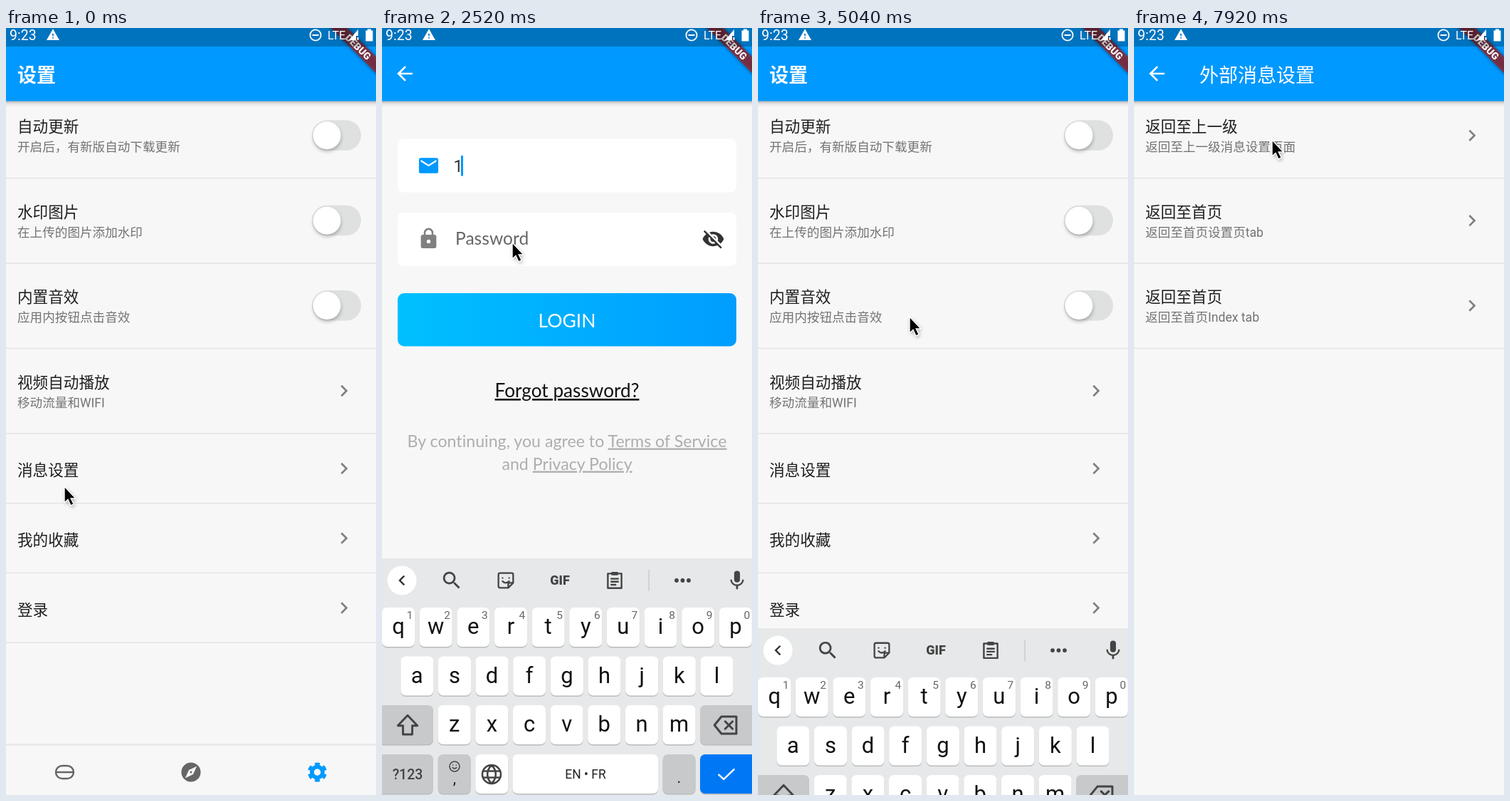
Recreate the animation shown at these times as an HTML page. Size 520 px wide and 1076 px high, loop 8000 ms.

```html
<!DOCTYPE html>
<html lang="zh-CN">
<head>
<meta charset="utf-8">
<title>设置</title>
<style>
html, body { margin: 0; width: 100%; height: 100%; overflow: hidden; background: #f7f7f7 }
svg { display: block; width: 100vw; height: 100vh; font-family: Roboto, "Noto Sans CJK SC", sans-serif }
.brand { font-family: Lato, sans-serif; font-variant-ligatures: none }
.line { fill: none; stroke: #444; stroke-width: 2; stroke-linejoin: round; stroke-linecap: round }
</style>
</head>
<body>
<svg id="stage" viewBox="0 0 520 1076"></svg>
<script>
const BLUE = '#0099ff', GREY = '#808080', DP = 1.357, HEIGHT = 1082;

const rect = (x, y, w, h, fill, more = '') =>
  `<rect x="${x}" y="${y}" width="${w}" height="${h}" fill="${fill}" ${more}/>`;
const circle = (x, y, r, more) => `<circle cx="${x}" cy="${y}" r="${r}" ${more}/>`;
const text = (s, x, y, size, fill, more = '') =>
  `<text x="${x}" y="${y}" font-size="${size}" fill="${fill}" ${more}>${s}</text>`;
const mid = 'text-anchor="middle"';
// 24-unit icon centred on x, y
const icon = (d, x, y, more, scale = DP) =>
  `<path transform="translate(${x} ${y}) scale(${scale}) translate(-12 -12)" d="${d}" ${more}/>`;
const fill = c => `fill="${c}"`;
const line = 'class="line"';

const paths = {
  back: 'M20 11H7.83l5.59-5.59L12 4l-8 8 8 8 1.41-1.41L7.83 13H20z',
  next: 'M10 6 8.59 7.41 13.17 12l-4.58 4.59L10 18l6-6z',
  prev: 'M15.41 7.41 14 6l-6 6 6 6 1.41-1.41L10.83 12z',
  warn: 'M1 21h22L12 2 1 21zm12-3h-2v-2h2v2zm0-4h-2v-4h2v4z',
  compass: 'M12 10.9a1.1 1.1 0 1 0 0 2.2 1.1 1.1 0 0 0 0-2.2zM12 2a10 10 0 1 0 0 20 10 10 0 0 0 0-20zm2.19 12.19L6 18l3.81-8.19L18 6z',
  mail: 'M20 4H4a2 2 0 0 0-2 2v12a2 2 0 0 0 2 2h16a2 2 0 0 0 2-2V6a2 2 0 0 0-2-2zm0 4l-8 5-8-5V6l8 5 8-5z',
  lock: 'M18 8h-1V6A5 5 0 0 0 7 6v2H6a2 2 0 0 0-2 2v10a2 2 0 0 0 2 2h12a2 2 0 0 0 2-2V10a2 2 0 0 0-2-2zm-6 9a2 2 0 1 1 0-4 2 2 0 0 1 0 4zm3.1-9H8.9V6a3.1 3.1 0 0 1 6.2 0z',
  hidden: 'M12 7c2.76 0 5 2.24 5 5 0 .65-.13 1.26-.36 1.83l2.92 2.92c1.51-1.26 2.7-2.89 3.43-4.75-1.73-4.39-6-7.5-11-7.5-1.4 0-2.74.25-3.98.7l2.16 2.16C10.74 7.13 11.35 7 12 7zM2 4.27l2.74 2.74C3.08 8.3 1.78 10.02 1 12c1.73 4.39 6 7.5 11 7.5 1.55 0 3.03-.3 4.38-.84L19.73 22 21 20.73 3.27 3zM7.53 9.8l1.55 1.55c-.05.21-.08.43-.08.65 0 1.66 1.34 3 3 3 .22 0 .44-.03.65-.08l1.55 1.55c-.67.33-1.41.53-2.2.53-2.76 0-5-2.24-5-5 0-.79.2-1.53.53-2.2zm4.31-.78l3.15 3.15.02-.16c0-1.66-1.34-3-3-3z',
  search: 'M15.5 14h-.79l-.28-.27A6.5 6.5 0 1 0 9.5 16c1.61 0 3.09-.59 4.23-1.57l.27.28v.79l5 5L20.49 19zm-6 0a4.5 4.5 0 1 1 0-9 4.5 4.5 0 0 1 0 9z',
  sticker: 'M5 3h14a2 2 0 0 1 2 2v10l-6 6H5a2 2 0 0 1-2-2V5a2 2 0 0 1 2-2zM21 15h-4a2 2 0 0 0-2 2v4M8 9h.1M16 9h.1M8 13q4 4 8 0',
  clip: 'M4 4h16v17H4zM9 3h6v2H9zM8 10h8M8 13.5h8M8 17h5',
  mic: 'M12 14a3 3 0 0 0 3-3V5a3 3 0 0 0-6 0v6a3 3 0 0 0 3 3zm5.3-3c0 3-2.54 5.1-5.3 5.1S6.7 14 6.7 11H5c0 3.41 2.72 6.23 6 6.72V21h2v-3.28c3.28-.48 6-3.3 6-6.72z',
  shift: 'M12 2.5 2.5 12.5h5V21h9v-8.5h5z',
  erase: 'M8 4h14v16H8L1.5 12zM11.5 8.5l7 7m0-7l-7 7',
  globe: 'M12 2a10 10 0 0 0 0 20 10 10 0 0 0 0-20c-6 6-6 14 0 20 6-6 6-14 0-20M3 8.5h18M3 15.5h18',
  check: 'M3.5 12.5l5.5 5L20.5 6.5'
};

// ---- list pages ----
const label = (s, x, cy, size, color, more) => text(s, x, cy + size * .38, size, color, more);

function toggle(y) {
  return rect(430, y - 21.5, 69, 42.5, '#dfe0e0', 'rx="21.2"') +
    circle(451.5, y + 3, 19.5, 'fill="#000" opacity=".25" filter="url(#soft)"') +
    circle(451, y, 19.5, fill('#fff'));
}

// items: [title, subtitle, hasToggle]
function list(items) {
  let y = 91.3;
  return items.map(([title, sub, hasToggle]) => {
    const top = y, cy = top + (sub ? 59.5 : 49);
    y += sub ? 119.4 : 97.8;
    return label(title, 16, top + (sub ? 46.8 : 51), 21.6, '#1e1e1e') +
      (sub ? label(sub, 16, top + 75.5, 17.6, '#737373') : '') +
      (hasToggle ? toggle(cy) : icon(paths.next, 475, cy, fill(GREY))) +
      rect(0, y - .7, 520, 1.3, '#e2e2e2');
  }).join('');
}

function page(id, title, weight, body, back = true) {
  return `<g id="${id}">` + rect(0, -6, 520, HEIGHT, '#f7f7f7') + body +
    rect(0, 102, 520, 9, 'url(#shade)') + rect(0, -6, 520, 108.5, BLUE) +
    (back ? icon(paths.back, 32, 64, fill('#fff')) : '') +
    label(title, back ? 92 : 16, 66, 27, '#fff', `font-weight="${weight}"`) + '</g>';
}

const navBar = rect(0, 1004, 520, 3, '#000', 'opacity=".05"') + rect(0, 1007, 520, 69, '#f7f7f7') +
  `<path d="M79 1035h7a9 9 0 0 1 0 18h-7a9 9 0 0 1 0-18zM70 1044h25" fill="none" stroke="#666" stroke-width="2.4"/>` +
  icon(paths.compass, 260, 1044, fill('#666')) +
  `<g transform="translate(437.5 1044) scale(${DP}) rotate(30)" fill="none" stroke="${BLUE}">` +
  circle(0, 0, 5.6, 'stroke-width="4.2"') +
  circle(0, 0, 8.4, 'stroke-width="3.2" pathLength="60" stroke-dasharray="5.6 4.4" stroke-dashoffset="2.8"') + '</g>';

// ---- login page ----
const under = s => `<tspan text-decoration="underline">${s}</tspan>`;
const field = y => rect(22, y, 476, 75, '#fff', 'rx="8"');
const loginForm = '<g class="brand">' + field(155.5) + field(259) +
  icon(paths.mail, 65.5, 193, 'id="mail"') + icon(paths.lock, 65.5, 295.5, 'id="lock"') +
  icon(paths.hidden, 465.5, 296, fill('#333')) +
  text('Email Address', 103, 201.5, 24.6, '#666', 'id="mailHint"') +
  text('Password', 103, 303.5, 24.6, '#666', 'id="passHint"') +
  text('1', 100.5, 202, 23.5, '#333', 'id="mailText" font-family="Roboto, sans-serif"') +
  circle(107.3, 295, 3.2, 'id="passText" fill="#333"') +
  rect(111, 179, 3, 28.5, BLUE, 'id="caret"') +
  rect(22, 372, 476, 74.5, 'url(#glow)', 'id="button" rx="9"') +
  text('LOGIN', 260, 419.5, 26.5, '#fff', mid) +
  text(under('Forgot password?'), 260, 518, 26.2, '#111', mid) +
  text('By continuing, you agree to ' + under('Terms of Service'), 260, 587.5, 23.2, '#aeaeae', mid) +
  text('and ' + under('Privacy Policy'), 260, 619.5, 23.2, '#aeaeae', mid) + '</g>' +
  text('Not a part of a component yet?', 260, 972.5, 24.3, '#111', mid) +
  text(under('Create a fliv account'), 260, 1005, 24.3, BLUE, mid + ' font-weight="700"');

// ---- keyboard ----
const key = (x, cy, w, color) =>
  rect(x, cy - 25.5, w, 55, '#b9bbbd', 'rx="7"') + rect(x, cy - 27, w, 55, color, 'rx="7"');
const letters = (chars, x0, cy, digits) => [...chars].map((c, i) => {
  const x = x0 + i * 52.65;
  return key(x - 23, cy, 46, '#fff') + text(c, x, cy + 10, 31, '#111', mid) +
    (digits ? text((i + 1) % 10, x + 16, cy - 11, 15.5, '#666', mid) : '');
}).join('');
const DARK = '#c7c9cb';
const keyboard = '<g id="keyboard">' + rect(0, 744, 520, 340, '#e6e8e9') +
  circle(28, 775, 20.5, fill('#fff')) + icon(paths.prev, 28, 775, fill('#333'), 1.2) +
  icon(paths.search, 98, 775, fill('#444')) + icon(paths.sticker, 174, 775, line, 1.15) +
  text('GIF', 250, 781, 18, '#444', mid + ' font-weight="900"') +
  icon(paths.clip, 327, 775, line, 1.2) + rect(374.5, 760, 1.3, 30, '#c4c6c8') +
  [414, 422.5, 431].map(x => circle(x, 775, 2.9, fill('#444'))).join('') +
  icon(paths.mic, 499, 775, fill('#444')) +
  letters('qwertyuiop', 23, 840, true) + letters('asdfghjkl', 49.3, 908.5) + letters('zxcvbnm', 101.7, 977) +
  key(-8, 977, 80, DARK) + icon(paths.shift, 36, 978, line, 1.45) +
  key(447, 977, 81, DARK) + icon(paths.erase, 483, 978, line, 1.5) +
  key(-8, 1046, 80, DARK) + text('?123', 36, 1054, 19.5, '#444', mid + ' font-weight="500"') +
  key(78.7, 1046, 46, DARK) + circle(102, 1036, 7, 'class="line" style="stroke-width:1.5"') +
  icon('M9 9.5h.1M15 9.5h.1M8.5 14q3.5 3 7 0', 102, 1036, line, .8) + text(',', 102, 1060, 22, '#222', mid) +
  key(131.3, 1046, 46, '#fff') + icon(paths.globe, 154, 1047, line, 1.3) +
  key(183.5, 1046, 204.5, '#fff') + text('EN • FR', 286, 1053, 17.5, '#222', mid) +
  key(394.6, 1046, 46, DARK) + text('.', 417.5, 1059, 22, '#222', mid) +
  key(447, 1046, 81, '#0078f5') + icon(paths.check, 484, 1047, 'class="line" style="stroke:#fff"', 1.25) + '</g>';

// ---- overlays ----
const spokes = Array.from({ length: 15 }, (_, i) =>
  `<path d="M0-20V-45" transform="rotate(${i * 24})" opacity="${1 - i * .055}"/>`).join('');
const dialog = '<g id="dialog">' + rect(0, -6, 520, HEIGHT, '#000', 'opacity=".54"') +
  `<g id="spinner" stroke="#dc2236" stroke-width="4" stroke-linecap="round">${spokes}</g></g>`;

const banner = '<g transform="translate(527.5 -6) rotate(45)">' +
  rect(-60, 38, 120, 16.3, '#000', 'opacity=".5" filter="url(#soft)"') +
  rect(-60, 38, 120, 16.3, '#b71c1c', 'opacity=".63"') +
  text('DEBUG', 0, 51, 13.8, '#fff', mid + ' font-weight="900"') + '</g>';

const status = rect(0, -6, 520, 32, '#000', 'opacity=".25"');
const statusIcons = text('9:23', 5, 17, 19.5, '#fff') + icon(paths.warn, 66, 9.5, fill('#fff'), .82) +
  circle(435, 10, 7.6, 'fill="none" stroke="#fff" stroke-width="1.8"') + rect(430.5, 9, 9, 2, '#fff') +
  text('LTE', 452, 16, 16, '#fff') +
  '<path d="M495 2v9h-3v6h-10zM493.5 13h2v4h-2z" fill="#fff"/>' +
  '<path d="M508 1.5h5v2h2.5v15h-10v-15h2.5z" fill="#fff"/>';

const pointer = '<g id="pointer"><path d="M1 2V25l5-4.500 4 9 4.500-2-4-8.500h7z" opacity=".35" filter="url(#soft)"/>' +
  '<path d="M0 0V23l5-4.500 4 8.500 4.200-2-4-8h6.800z" fill="#000" stroke="#fff" stroke-width="1.4"/></g>';

stage.innerHTML = `<defs>
  <filter id="soft" x="-50%" y="-100%" width="200%" height="300%"><feGaussianBlur stdDeviation="2.5"/></filter>
  <linearGradient id="shade" x2="0" y2="1"><stop stop-opacity=".3"/><stop offset=".45" stop-opacity=".08"/><stop offset="1" stop-opacity="0"/></linearGradient>
  <linearGradient id="glow"><stop stop-color="#00c0ff"/><stop offset="1" stop-color="#009dff"/></linearGradient>
</defs>` +
  page('settings', '设置', 700, list([
    ['自动更新', '开启后，有新版自动下载更新', true],
    ['水印图片', '在上传的图片添加水印', true],
    ['内置音效', '应用内按钮点击音效', true],
    ['视频自动播放', '移动流量和WIFI'],
    ['消息设置'], ['我的收藏'], ['登录']
  ]) + navBar, false) +
  page('login', '', 400, loginForm) +
  page('messages', '消息设置', 700, list([['外部消息设置'], ['内部消息设置']])) +
  page('external', '外部消息设置', 400, list([
    ['返回至上一级', '返回至上一级消息设置页面'],
    ['返回至首页', '返回至首页设置页tab'],
    ['返回至首页', '返回至首页Index tab']
  ])) + dialog + banner + status + keyboard + statusIcons + pointer;

// ---- motion ----
const $ = id => document.getElementById(id);
const ramp = (t, a, b) => Math.min(1, Math.max(0, (t - a) / (b - a)));
const smooth = (t, a, b) => { const p = ramp(t, a, b); return p * p * (3 - 2 * p); };
const slide = (t, from) => HEIGHT * ramp(t, from, from + 300);
const move = (id, x, y) => $(id).setAttribute('transform', `translate(${x} ${y})`);
const show = (id, on) => $(id).style.display = on ? '' : 'none';

// pointer stops: leave at, arrive at, x, y
const stops = [
  [0, 0, 82, 643], [120, 480, 82, 602], [950, 1550, 135, 205], [2280, 2520, 183, 301],
  [3000, 3330, 213, 405], [5050, 5700, 167, 628], [6200, 6750, 141, 177], [7300, 7920, 194, 157]
];
const MAIL_FOCUS = 1640, MAIL_TYPED = 2250, PASS_FOCUS = 2620, PASS_TYPED = 2900, SUBMIT = 3420, DONE = 4489.4;

function draw(t) {
  let [, , x, y] = stops[0];
  for (const [a, b, sx, sy] of stops.slice(1)) {
    const p = smooth(t, a, b);
    x += (sx - x) * p;
    y += (sy - y) * p;
  }
  move('pointer', x, y);

  move('login', 0, HEIGHT - slide(t, 590.4) + slide(t, DONE));
  move('messages', 0, HEIGHT - slide(t, 5830.7));
  move('external', 0, HEIGHT - slide(t, 6860));

  const keys = smooth(t, 1740, 2000) - smooth(t, SUBMIT, 3650) + smooth(t, 4555, 4830) - smooth(t, 4950, 5200);
  move('keyboard', 0, 332 * (1 - keys));

  const onMail = t >= MAIL_FOCUS && t < PASS_FOCUS;
  const onPass = t >= PASS_FOCUS && t < SUBMIT || t >= DONE;
  $('mail').setAttribute('fill', onMail ? BLUE : GREY);
  $('lock').setAttribute('fill', onPass ? BLUE : GREY);
  show('mailHint', t < MAIL_TYPED);
  show('mailText', t >= MAIL_TYPED);
  show('passHint', t < PASS_TYPED);
  show('passText', t >= PASS_TYPED);

  const typed = onMail ? t >= MAIL_TYPED : t >= PASS_TYPED;
  const since = [DONE, PASS_TYPED, PASS_FOCUS, MAIL_TYPED, MAIL_FOCUS].find(s => t >= s) || 0;
  show('caret', (onMail || onPass) && (t - since) % 1000 < 500);
  $('caret').setAttribute('x', typed ? 111 : 103);
  $('caret').setAttribute('y', onMail ? 179 : 280.5);
  $('button').setAttribute('fill', t < DONE ? 'url(#glow)' : BLUE);

  $('dialog').setAttribute('opacity', smooth(t, SUBMIT, 3570) - smooth(t, DONE, DONE + 300));
  $('spinner').setAttribute('transform', `translate(260 555) rotate(${84 + (t - 3690) * 360 / 985})`);
}

const STEP = 90, start = performance.now();
function tick() {
  const t = (performance.now() - start) % 8000;
  draw(Math.min(7920, Math.floor(t / STEP) * STEP));
  requestAnimationFrame(tick);
}
tick();
</script>
</body>
</html>
```
